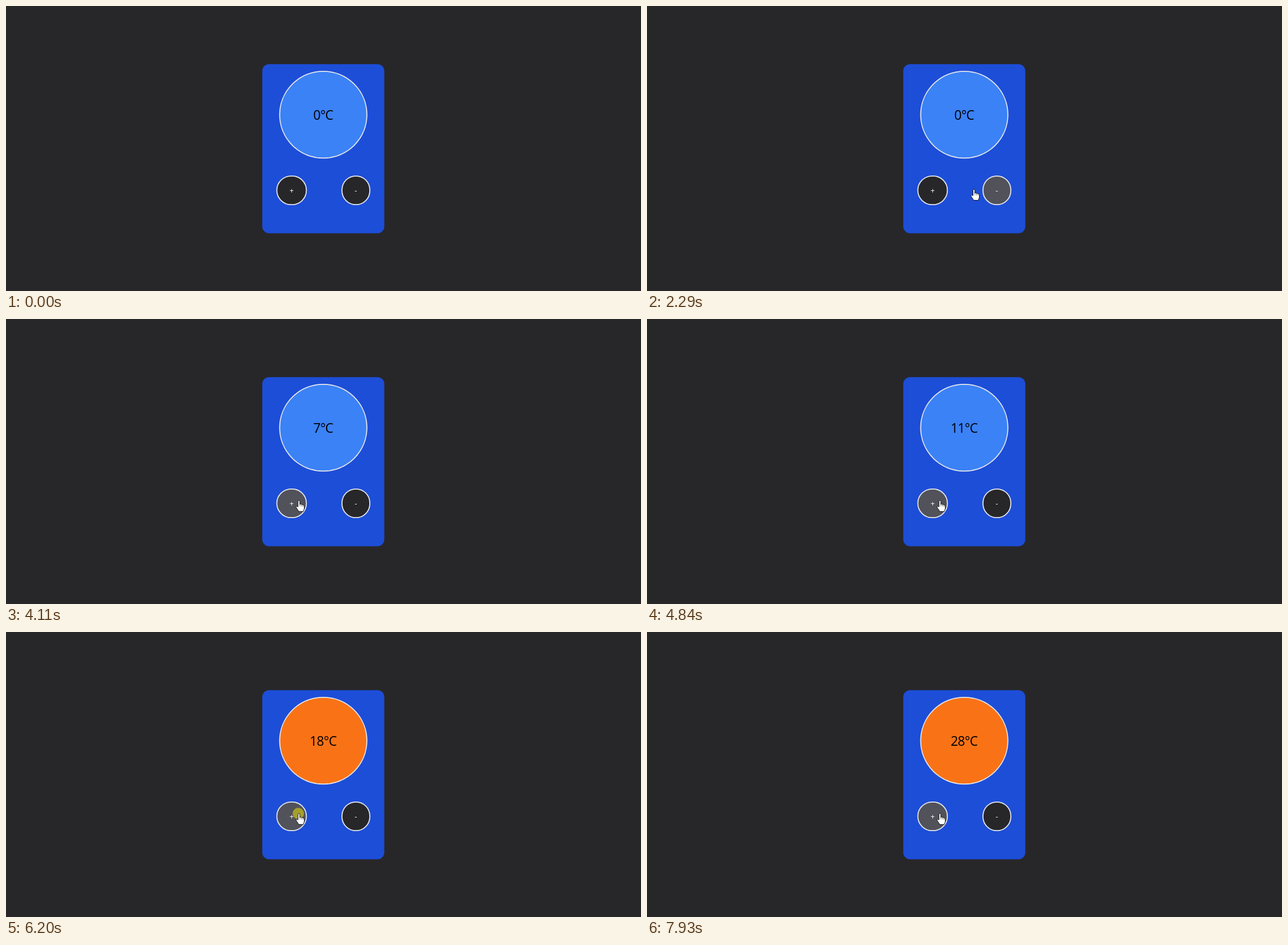
Recreate the animation shown at these times as an HTML page. Size 1117 by 501 pixels, loop 8 s.

```html
<!DOCTYPE html>
<html lang="en">
<head>
<meta charset="utf-8">
<title>Thermostat</title>
<style>
  html, body { margin: 0; width: 100%; height: 100%; overflow: hidden; background: #27272a; }
  svg { display: block; }
  text { font-family: "Open Sans", "Noto Sans", sans-serif; text-anchor: middle; }
  .ring { stroke: #e5e7eb; stroke-width: 1.8; }
  #temp { font-size: 22.8px; letter-spacing: -.8px; }
  .sign { font-size: 13px; fill: #fff; }
  .button { fill: #27272a; }
  .button.hover { fill: #52525b; }
  #dial { fill: #3b82f6; }
  #dial.warm { fill: #f97316; }
  #cursor path { fill: #fff; stroke: #111; stroke-width: 1; stroke-linejoin: round; }
  .off { display: none; }
</style>
</head>
<body>
<svg width="1117" height="501" viewBox="0 0 1117 501">
  <rect x="450.8" y="102.3" width="214.6" height="297.2" rx="12" fill="#1d4ed8"/>
  <ellipse id="dial" class="ring" cx="558.1" cy="191.1" rx="76.7" ry="76.3"/>
  <text id="temp" x="557.8" y="200">0°C</text>
  <rect id="plus" class="ring button" x="476.4" y="298.8" width="52" height="50.4" rx="25.2"/>
  <text class="sign" x="502.4" y="328.5">+</text>
  <rect id="minus" class="ring button" x="591" y="298.8" width="49" height="50.4" rx="24.5"/>
  <text class="sign" x="615.4" y="328.5">-</text>
  <circle id="press" cx="514.2" cy="319" r="10" fill="#f5eb00" fill-opacity=".5"/>
  <g id="cursor">
    <path id="arrow" d="M.5.5V16.5L4.2 13L6.8 18.8L9.2 17.8L6.7 12H11.6Z"/>
    <g id="hand">
      <path d="M-1.5 11.5V1.8a1.6 1.6 0 0 1 3.2 0V7c.6-.8 2.6-.6 2.8.6c.8-.7 2.4-.4 2.6.8c1-.5 2.4 0 2.4 1.4V14c0 2-1.4 3-1.6 5.5H-.6c-.3-2.2-2.8-4.2-4.2-7.2c-.6-1.6 1-2.4 2-1.5z"/>
      <path d="M1.7 7v3.5M4.5 8v2.8M7.1 8.8v2.4" style="stroke-width:.6"/>
    </g>
  </g>
</svg>
<script>
const LOOP = 8000, TICK = 70, WARM_FROM = 15, PRESS_FROM = .58;
const $ = id => document.getElementById(id);
const show = (id, on) => $(id).classList.toggle("off", !on);

// Clicking pace: [time, clicks so far].
const pace = [[2890, 0], [3175, 2], [4105, 7], [5575, 15], [7125, 24], [7920, 28]];

// Eased pointer moves, bent towards a control point.
const moves = [
  { start: 390, end: 460, from: [870, 486], bend: [824, 485], to: [778, 484], exit: 530 },
  { start: 920, end: 1690, from: [776, 480], bend: [630, 380], to: [625, 334] },
  { start: 1760, end: 1890, from: [623, 334], bend: [621, 334], to: [619, 334] },
  { start: 2290, end: 2840, from: [575, 322], bend: [540, 320], to: [515.2, 318.8] }
];

function clicksAt(t) {
  const next = pace.findIndex(p => p[0] > t);
  if (next < 1) return next < 0 ? pace.at(-1)[1] : 0;
  const [t0, n0] = pace[next - 1], [t1, n1] = pace[next];
  return n0 + (n1 - n0) * (t - t0) / (t1 - t0);
}

function pointerAt(t) {
  const move = moves.findLast(m => m.start <= t);
  if (!move || t >= move.exit) return null;
  const elapsed = Math.floor((t - move.start) / TICK) * TICK;
  const k = Math.min(1, elapsed / (move.end - move.start));
  const u = k * (2 - k), v = 1 - u;
  return [0, 1].map(i => v * v * move.from[i] + 2 * u * v * move.bend[i] + u * u * move.to[i]);
}

const inside = (p, cx) => !!p && Math.hypot(p[0] - cx, p[1] - 324) < 26;

function draw(t) {
  const clicks = clicksAt(t), count = Math.floor(clicks);
  $("temp").textContent = count + "°C";
  $("dial").classList.toggle("warm", count >= WARM_FROM);
  show("press", clicks - count > PRESS_FROM);

  // Hover follows the pointer one tick late.
  const p = pointerAt(t), late = pointerAt(t - TICK);
  const onPlus = inside(late, 502.4), onMinus = inside(late, 615.4);
  $("plus").classList.toggle("hover", onPlus);
  $("minus").classList.toggle("hover", onMinus);
  show("cursor", !!p);
  show("hand", onPlus || onMinus);
  show("arrow", !onPlus && !onMinus);
  if (p) $("cursor").setAttribute("transform", `translate(${p[0]} ${p[1]})`);
}

const begin = performance.now();
function frame() {
  draw((performance.now() - begin) % LOOP);
  requestAnimationFrame(frame);
}
frame();
</script>
</body>
</html>
```
